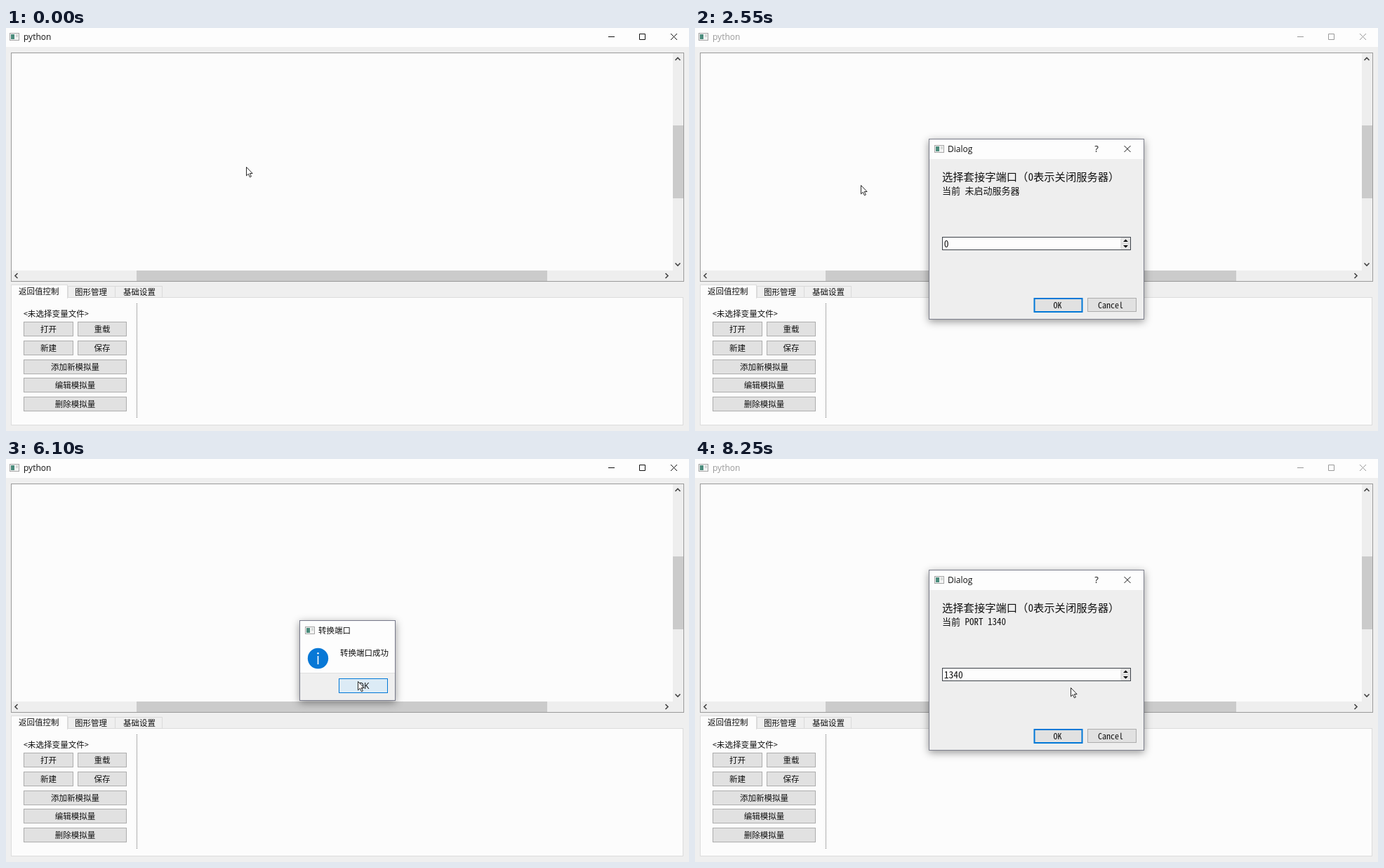
Animation, 973 px wide and 575 px high, one loop 8300 ms. Source, as an HTML page:

```html
<!DOCTYPE html>
<html lang="zh">
<head>
<meta charset="utf-8">
<style>
html, body { margin: 0; width: 100%; height: 100%; overflow: hidden; background: #efefef; }
svg { display: block; width: 973px; height: 575px; }
text { font: 11.5px "Open Sans", "Noto Sans CJK SC", "Noto Sans CJK", sans-serif; fill: #111; white-space: pre; }
.latin { font-size: 12px; }
.mono { font-family: "Noto Sans Mono CJK SC", "Noto Sans CJK SC", "Noto Sans CJK", monospace; }
.mid { text-anchor: middle; }
.line { fill: none; stroke: #111; }
.popup { transform-box: fill-box; transform-origin: center; filter: drop-shadow(0 3px 6px #0006); }
#menu { filter: drop-shadow(2px 2px 1px #0007); }
</style>
</head>
<body>
<svg id="stage" viewBox="0 0 973 575"></svg>
<script>
const LOOP = 8300, STEP = 50;
const $ = id => document.getElementById(id);

const rect = (x, y, w, h, fill, stroke = 'none', extra = '') =>
  `<rect x="${x}" y="${y}" width="${w}" height="${h}" fill="${fill}" stroke="${stroke}" ${extra}/>`;
// y is the vertical middle of the text
const text = (x, y, s, cls = '', size = 11.5, id = '') =>
  `<text x="${x}" y="${y + size * 0.37}" class="${cls}" style="font-size:${size}px" id="${id}">${s}</text>`;
const path = (d, width = 1, color = '#111') =>
  `<path class="line" d="${d}" style="stroke:${color};stroke-width:${width}"/>`;
const cross = (x, y) => path(`M${x - 4.5} ${y - 4.5}l9 9m0 -9l-9 9`);
const icon = (x, y) =>
  rect(x + .5, y + .5, 13, 10, '#f3f3f3', '#a5a5a5') + rect(x + 2, y + 2, 5, 7, '#4b8c7c') +
  rect(x + 9, y + 2, 3, 4, '#d5d9d7');
const button = (x, y, w, label) =>
  rect(x + .5, y + .5, w, 20, '#e1e1e1', '#adadad') + text(x + w / 2 + .5, y + 10.5, label, 'mono mid');

const items = [
  [102, '无文件'], [120, '构建', 'F4'], [139, '执行', 'F5'], [163, '未启动服务器'],
  [188, '回到欢迎界面'], [207, '重新编辑项目'], [232, '没有程序运行']
];

const mainWindow = () =>
  rect(0, 0, 973, 27, '#fdfdfd') + icon(5, 7) +
  `<g id="caption">${text(25, 12.5, 'python', 'latin', 12)}
    ${path('M858 12.5h9M902.5 8.5h8v8h-8z')}${cross(951.5, 12.5)}</g>` +
  rect(7.5, 35.5, 958, 326, '#fcfcfc', '#9a9a9a') +
  rect(950, 36, 15, 325, '#eeeeee') + rect(8, 346, 942, 15, '#eeeeee') +
  rect(950, 139, 15, 104, '#cbcbcb') + rect(186, 346, 585, 15, '#cbcbcb') +
  path('M953.5 46l3.5 -3.5l3.5 3.5M953.5 335.5l3.5 3.5l3.5 -3.5M16.5 350l-3.5 3.5l3.5 3.5M939.5 350l3.5 3.5l-3.5 3.5', 1.6, '#444') +
  rect(7.5, 384.5, 957, 182, '#fcfcfc', '#dcdcdc') +
  rect(88.5, 368.5, 67, 16, '#efefef', '#dadada') + rect(155.5, 368.5, 67, 16, '#efefef', '#dadada') +
  rect(7.5, 366.5, 80, 19, '#fcfcfc', '#dcdcdc') + rect(8, 384, 79, 3, '#fcfcfc') +
  text(18, 376, '返回值控制') + text(98, 376.5, '图形管理') + text(167, 376.5, '基础设置') +
  text(25, 407.5, '&lt;未选择变量文件&gt;', 'mono', 11.6) +
  button(25, 419, 70, '打开') + button(102, 419, 69, '重载') +
  button(25, 446, 70, '新建') + button(102, 446, 69, '保存') +
  button(25, 473, 146, '添加新模拟量') + button(25, 499, 146, '编辑模拟量') + button(25, 526, 146, '删除模拟量') +
  `<path d="M186.5 393v163" stroke="#666" stroke-dasharray="1 1"/>`;

const menu = () =>
  rect(63.5, 90.5, 129, 153, '#f0f0f0', '#cccccc') +
  rect(65.5, 93, 124, 18, '#91c5f0', 'none', 'id="hilite"') +
  path('M88 151.5h100M88 175.5h100M88 219.5h100', 1, '#d2d2d2') +
  items.map(([y, label, key], i) =>
    text(91, y, label, '', 11.5, 'item' + i) + (key ? text(165, y, key, 'latin', 12) : '')).join('');

const dialog = () =>
  rect(333.5, 158.5, 306, 257, '#eeeeee', '#7d7f8c') + rect(334, 159, 305, 28, '#fdfdfd') +
  icon(341, 167) + text(360, 172.5, 'Dialog', 'latin', 12) +
  `<g id="dialogTools">${text(572, 172.5, '?', 'mid', 13)}${cross(616, 172.5)}</g>` +
  text(352, 212.5, '选择套接字端口（0表示关闭服务器）', 'mono', 15.3) +
  text(352, 232.5, '', 'mono', 13, 'current') +
  rect(352.5, 298.5, 268, 18, '#fdfdfd', '#333', 'id="field"') +
  rect(607, 300, 12, 7, '#ececec', '#d2d2d2') + rect(607, 308, 12, 7, '#ececec', '#d2d2d2') +
  `<path d="M610 305h7l-3.5 -3.5zM610 310h7l-3.5 3.5z"/>` +
  text(354.7, 308, '', 'mono', 13.5, 'value') +
  rect(0, 301, 1, 14, '#111', 'none', 'id="caret"') +
  rect(483.5, 386, 68, 19, '#e1e1e1', '#0078d7', 'id="ok"') + text(516.5, 396, 'OK', 'mono mid', 12) +
  rect(559.5, 385.5, 69, 19, '#e1e1e1', '#adadad') + text(592, 396, 'Cancel', 'mono mid', 12);

const message = () =>
  rect(418.5, 230.5, 136, 114, '#fdfdfd', '#77798a') + rect(419, 305, 135, 39, '#efefef') +
  path('M419 305.5h135', 1, '#dfdfdf') +
  icon(426, 239) + text(445, 245, '转换端口') + `<g id="messageTools">${cross(534, 245.5)}</g>` +
  `<circle cx="444.5" cy="284.5" r="14.7" fill="#0878d6"/>` +
  path('M444.5 281v12', 1.6, '#fff') + `<circle cx="444.5" cy="277.3" r="1.2" fill="#fff"/>` +
  text(476, 277, '转换端口成功') +
  rect(474.5, 313.5, 69, 20, '#e1e1e1', '#0078d7', 'id="confirm"') + text(509, 323.7, 'OK', 'mid', 12);

$('stage').innerHTML = mainWindow() +
  `<g id="menu">${menu()}</g><g id="dialog" class="popup">${dialog()}</g>
   <g id="message" class="popup">${message()}</g>
   <g id="pointer">
     <path id="arrow" d="M.5 .5v12.3l2.8 -2.6l2.1 4.6l2 -.9l-2.1 -4.4h3.8z" fill="#fff" stroke="#111" stroke-width=".9"/>
     <path id="beam" class="line" d="M-3 -7.5h6M.5 -7.5v15M-3 7.5h6"/>
   </g>`;

// time, x, y of the pointer tip
const route = [
  [0, 342, 198], [100, 342, 198], [850, 64, 91], [1400, 64, 91], [2050, 133, 158], [2250, 133, 158],
  [2900, 366, 308], [3250, 366, 308], [3500, 423, 272], [4100, 423, 272], [4850, 523, 395],
  [5250, 523, 395], [5800, 501, 317], [6150, 501, 317], [6600, 60, 87], [6900, 60, 87],
  [7200, 84, 106], [7550, 110, 154], [7650, 110, 154], [8250, 535, 326]
];
const typing = [[0, '0'], [3300, '10'], [3800, '130'], [4100, '1340']];

const clamp = v => Math.max(0, Math.min(1, v));
const within = (t, a, b) => t >= a && t < b;
const display = (id, on) => $(id).style.display = on ? '' : 'none';

function pointerAt(t) {
  const i = Math.max(1, route.findIndex(p => p[0] >= t));
  const [a, b] = [route[i - 1], route[i]];
  const p = clamp((t - a[0]) / (b[0] - a[0])), e = p * p * (3 - 2 * p);
  return [a[1] + (b[1] - a[1]) * e, a[2] + (b[2] - a[2]) * e];
}

function popup(id, t, opened, closed) {
  const enter = clamp((t - opened) / 200), leave = clamp((t - closed) / 250);
  display(id, enter > 0 && leave < 1);
  $(id).style.opacity = enter * enter * (1 - leave);
  $(id).style.transform = `scale(${0.95 + 0.05 * enter - 0.05 * leave})`;
}

function hover(id, on) {
  $(id).setAttribute('fill', on ? '#dcebf6' : '#e1e1e1');
  $(id).setAttribute('stroke-width', on ? 1 : 2);
}

function draw(t) {
  const [x, y] = pointerAt(t), again = t > 6600;

  $('caption').style.opacity = within(t, 2300, 6100) || t >= 7700 ? 0.42 : 1;

  const shift = again ? -4 : 0;
  display('menu', within(t, 1050, 2200) || within(t, 6800, 7650));
  $('menu').setAttribute('transform', `translate(${shift} ${shift})`);
  $('item3').textContent = again ? 'PORT 1340' : '未启动服务器';
  $('item3').style.fontSize = again ? '12px' : '11.5px';
  const hit = items.find(([row]) => Math.abs(y - shift - row) <= 9);
  display('hilite', hit && x > 65);
  if (hit) $('hilite').setAttribute('y', hit[0] - 9);

  if (again) popup('dialog', t, 7700, LOOP + 1); else popup('dialog', t, 2300, 5100);
  display('dialogTools', again || t < 5100);
  const [pressed, value] = typing.findLast(([at]) => at <= t);
  const focused = within(t, 3000, 5300);
  $('current').textContent = '当前 ' + (again ? 'PORT 1340' : '未启动服务器');
  $('value').textContent = value;
  $('field').setAttribute('stroke', focused ? '#2a86c4' : '#3c4148');
  display('caret', focused && t < 5100 && (t - pressed) % 1060 < 530);
  $('caret').setAttribute('x', 355 + 6.75 * (value.length - 1));
  hover('ok', within(x, 483, 552) && within(y, 386, 406));

  popup('message', t, 5100, 6100);
  display('messageTools', t < 6100);
  hover('confirm', within(x, 474, 544) && within(y, 313, 334));

  const editing = within(t, 2500, 5000) && within(x, 352, 607) && within(y, 298, 317);
  display('beam', editing);
  display('arrow', !editing);
  $('pointer').setAttribute('transform', `translate(${Math.round(x)} ${Math.round(y)})`);
}

const start = performance.now();
function tick() {
  const t = (performance.now() - start) % LOOP;
  draw(Math.floor(t / STEP) * STEP);
  requestAnimationFrame(tick);
}
tick();
</script>
</body>
</html>
```
